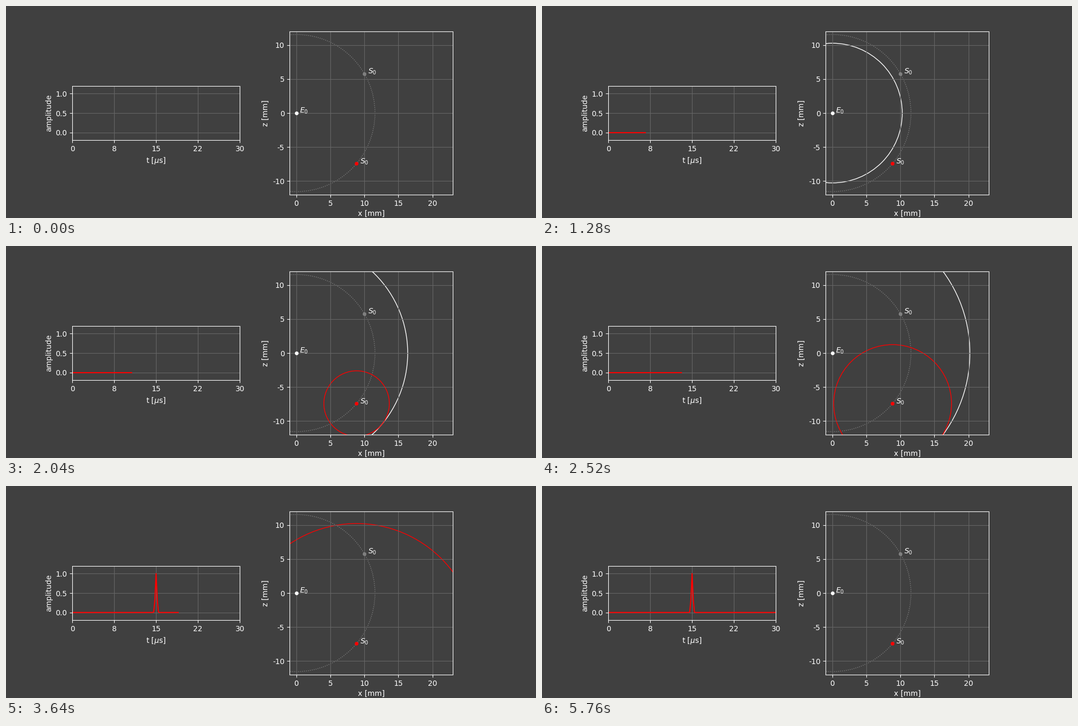
Animation, 1000 px wide and 400 px high, one loop 8000 ms. Source, as a matplotlib script:

```python
import numpy as np
import matplotlib.pyplot as plt
from matplotlib.animation import FuncAnimation
from matplotlib.patches import Circle

BG = "#404040"
GRID = "#666666"
SPEED = 1.54          # mm per microsecond
T_END = 30.0          # microseconds
STEPS = 144           # moving steps, then the picture holds
FRAMES = 200
INTERVAL = 40

plt.rcParams.update({
    "font.family": "DejaVu Sans",
    "font.size": 10,
    "text.color": "white",
    "axes.edgecolor": "white",
    "axes.labelcolor": "white",
    "xtick.color": "white",
    "ytick.color": "white",
    "axes.facecolor": BG,
    "figure.facecolor": BG,
    "grid.color": GRID,
})

t = np.linspace(0, T_END, STEPS + 1)
pulse = np.exp(-((t - T_END / 2) / 0.2) ** 2)
dist = SPEED * T_END / 4   # emitter to scatterer


def polar(deg):
    a = np.radians(deg)
    return dist * np.cos(a), dist * np.sin(a)


def set_ticks(axis, values, fmt):
    axis.set_ticks(values, [format(v, fmt) for v in values])


def add_point(ax, pos, color, label):
    ax.plot(*pos, ".", color=color, ms=8)
    ax.text(pos[0] + 0.5, pos[1], label)


def add_ring(ax, center, color, **style):
    ring = Circle(center, 0, fill=False, edgecolor=color, **style)
    ax.add_patch(ring)
    return ring


fig = plt.figure(figsize=(10, 4), dpi=100)
grid = fig.add_gridspec(3, 2, width_ratios=[3, 4], wspace=0.1, hspace=0,
                        left=0.125, right=0.9, bottom=0.11, top=0.88)

# received signal
sig_ax = fig.add_subplot(grid[1, 0])
sig_ax.set(xlim=(0, T_END), ylim=(-0.2, 1.2),
           xlabel=r"t [$\mu$s]", ylabel="amplitude")
set_ticks(sig_ax.xaxis, np.linspace(0, T_END, 5), ".0f")
set_ticks(sig_ax.yaxis, [0, 0.5, 1], ".1f")
sig_ax.grid(True)
signal, = sig_ax.plot([], [], color="red", lw=1.5)

# wave field
field_ax = fig.add_subplot(grid[:, 1], aspect="equal")
field_ax.set(xlim=(-1, 23), ylim=(-12, 12), xlabel="x [mm]", ylabel="z [mm]")
set_ticks(field_ax.xaxis, range(0, 21, 5), "d")
set_ticks(field_ax.yaxis, range(-10, 11, 5), "d")
field_ax.grid(True)

origin = (0, 0)
target = polar(-40)
add_ring(field_ax, origin, "#808080", ls=":", lw=1).set_radius(dist)
add_point(field_ax, origin, "white", "$E_0$")
add_point(field_ax, polar(30), "#808080", "$S_0$")
add_point(field_ax, target, "red", "$S_0$")
wave = add_ring(field_ax, origin, "white", lw=1)
echo = add_ring(field_ax, target, "red", lw=1)


def update(i):
    n = min(i, STEPS)
    radius = SPEED * t[n]
    signal.set_data(t[:n + 1], pulse[:n + 1])
    wave.set_radius(radius)
    wave.set_visible(n > 0)
    echo.set_radius(max(radius - dist, 0))
    echo.set_visible(radius > dist)
    return signal, wave, echo


anim = FuncAnimation(fig, update, frames=FRAMES, interval=INTERVAL,
                     repeat=True, repeat_delay=0)
plt.show()
```
